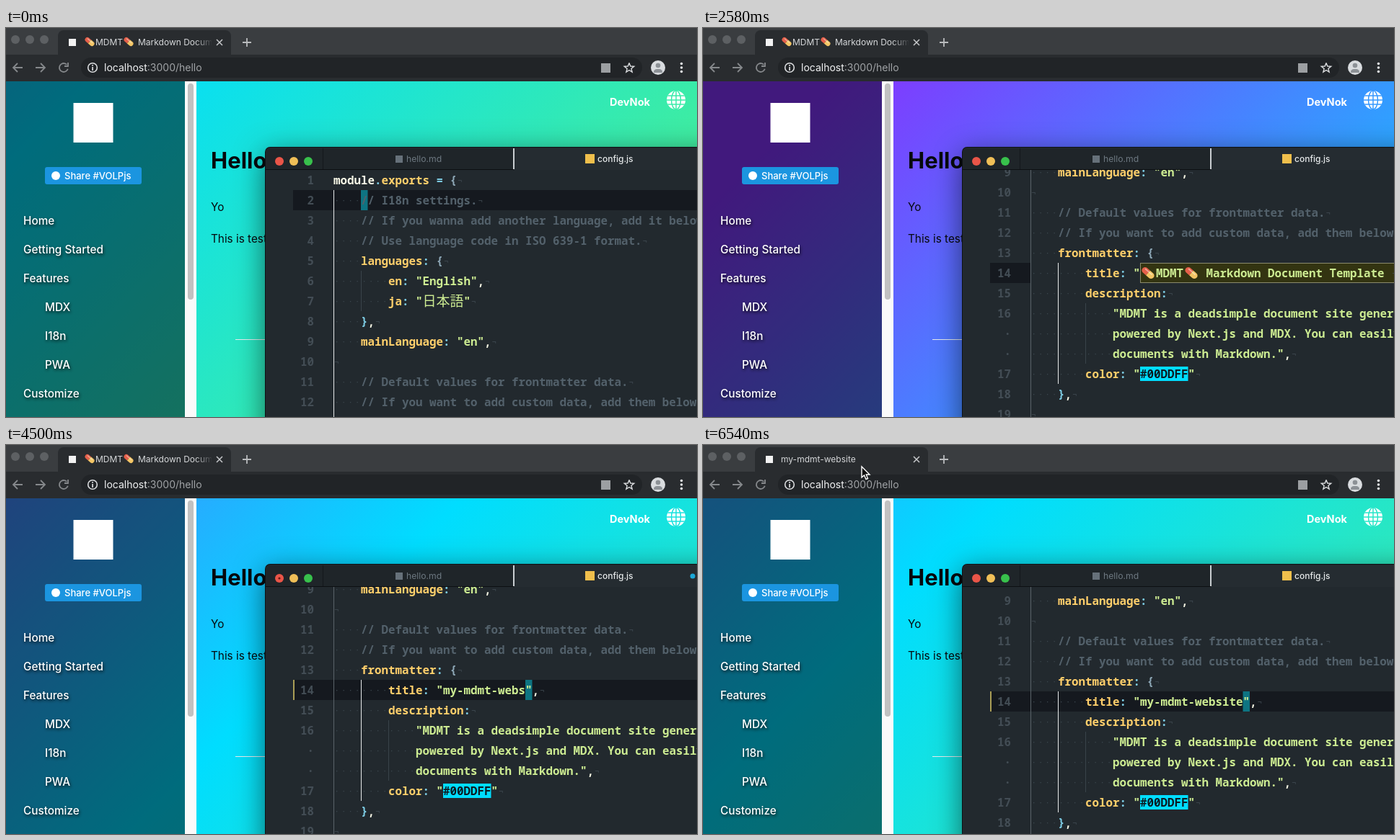
Animation, 958 px wide and 540 px high, one loop 6.6 s. Source, as an HTML page with a canvas:

```html
<!DOCTYPE html>
<html lang="en">
<head>
<meta charset="utf-8">
<title>Config editing</title>
<style>
html, body { margin: 0; width: 100%; height: 100%; overflow: hidden; background: #22282d; }
canvas { display: block; width: 958px; height: 540px; }
</style>
</head>
<body>
<canvas id="stage" width="958" height="540"></canvas>
<script>
const ctx = document.getElementById('stage').getContext('2d');
const W = 958, H = 540, LOOP = 6600, STEP = 60;
const SANS = 'Inter, Roboto, sans-serif';
const MONO = '600 15.833px "Noto Sans Mono", "DejaVu Sans Mono", monospace';
const CELL = 9.5, LEFT = 454, ROW = 28, TOP = 211;

// The page background drifts back and forth; a reload starts it again.
const HALF = 3000, FIRST_START = -2600, RELOAD = 5190, SECOND_START = 5090;
const CYAN_FAR = 1550, CYAN_NEAR = 100;

const INK = {
  c: '#53616b', k: '#ffcf6b', s: '#cdec92', p: '#7fd0e8',
  b: '#8fa9b8', w: '#f7f7e6', x: '#0b1a20', j: '#cdec92'
};

// Each segment starts with its ink key; "e" is the pill.
const ROWS = [
  ['1', 0, 'wmodule|p.|kexports|p = |b{'],
  ['2', 4, 'c// I18n settings.'],
  ['3', 4, 'c// If you wanna add another language, add it below.'],
  ['4', 4, 'c// Use language code in ISO 639-1 format.'],
  ['5', 4, 'klanguages|p: |b{'],
  ['6', 8, 'ken|p: |s"English"|w,'],
  ['7', 8, 'kja|p: |s"|j日本語|s"'],
  ['8', 4, 'p}|w,'],
  ['9', 4, 'kmainLanguage|p: |s"en"|w,'],
  ['10', 0, ''],
  ['11', 4, 'c// Default values for frontmatter data.'],
  ['12', 4, 'c// If you want to add custom data, add them below.'],
  ['13', 4, 'kfrontmatter|p: |b{'],
  ['14', 8, ''],
  ['15', 8, 'kdescription|p:'],
  ['16', 12, 's"MDMT is a deadsimple document site generator'],
  ['·', 12, 'spowered by Next.js and MDX. You can easily create'],
  ['·', 12, 'sdocuments with Markdown."|w,'],
  ['17', 8, 'kcolor|p: |s"|x#00DDFF|s"'],
  ['18', 4, 'p}|w,'],
  ['19', 0, '']
];

const clamp = u => Math.min(1, Math.max(0, u));
const mix = (a, b, u) => a + (b - a) * u;

// The CSS "ease" curve, cubic-bezier(.25, .1, .25, 1).
function ease(x) {
  const bez = (a, b, s) => 3 * a * s * (1 - s) ** 2 + 3 * b * s * s * (1 - s) + s ** 3;
  let lo = 0, hi = 1;
  for (let i = 0; i < 24; i++) {
    const s = (lo + hi) / 2;
    if (bez(0.25, 0.25, s) < x) lo = s; else hi = s;
  }
  return bez(0.1, 1, lo);
}

function cyanAt(t) {
  const phase = (t - (t < RELOAD ? FIRST_START : SECOND_START)) / HALF;
  const part = ease(phase % 1);
  const level = Math.floor(phase) % 2 ? 1 - part : part;
  return mix(CYAN_FAR, CYAN_NEAR, level);
}

function rect(x, y, w, h, fill) {
  ctx.fillStyle = fill;
  ctx.fillRect(x, y, w, h);
}

function round(x, y, w, h, r, fill) {
  ctx.beginPath();
  ctx.roundRect(x, y, w, h, r);
  ctx.fillStyle = fill;
  ctx.fill();
}

function disc(x, y, r, fill) {
  ctx.beginPath();
  ctx.arc(x, y, r, 0, Math.PI * 2);
  ctx.fillStyle = fill;
  ctx.fill();
}

function text(str, x, y, font, fill) {
  ctx.font = font;
  ctx.fillStyle = fill;
  ctx.fillText(str, x, y);
}

function lines(color, width, ...paths) {
  ctx.strokeStyle = color;
  ctx.lineWidth = width;
  ctx.beginPath();
  for (const p of paths)
    for (let i = 0; i < p.length; i += 2) ctx[i ? 'lineTo' : 'moveTo'](p[i], p[i + 1]);
  ctx.stroke();
}

function pill(x, y, size) {
  const r = size * 0.22, l = size * 0.5;
  ctx.save();
  ctx.translate(x, y);
  ctx.rotate(0.72);
  round(-l, -r, l, 2 * r, [r, 0, 0, r], '#e5604a');
  round(0, -r, l, 2 * r, [0, r, r, 0], '#f3c565');
  round(-l * 0.7, -r * 0.6, l * 1.3, r * 0.4, r * 0.2, 'rgba(255,255,255,.45)');
  ctx.restore();
}

function pageGradient(cyan) {
  const before = 1300, after = 1000;
  const from = (cyan - before) / 2, to = (cyan + after) / 2;
  const g = ctx.createLinearGradient(from, 74 + from, to, 74 + to);
  g.addColorStop(0, '#8533ff');
  g.addColorStop(before / (before + after), '#00ddff');
  g.addColorStop(1, '#44ee99');
  return g;
}

function drawBrowser(t) {
  rect(0, 0, W, 38, '#3a3d40');
  round(72, 3, 240, 36, [8, 8, 0, 0], '#292c2f');
  rect(0, 37, W, 37, '#292c2f');
  round(104, 41, 778, 28, 14, '#212427');
  for (const x of [13, 33, 53]) disc(x, 16, 6, '#5d6063');

  rect(87, 15, 10, 10, '#f2f2f2');
  const font = '400 12px ' + SANS;
  if (t < 5040) {
    pill(116, 19, 15);
    text('MDMT', 124, 24, font, '#d5d7d9');
    pill(170, 19, 15);
    ctx.save();
    ctx.beginPath();
    ctx.rect(180, 4, 105, 30);
    ctx.clip();
    const fade = ctx.createLinearGradient(262, 0, 285, 0);
    fade.addColorStop(0, '#d5d7d9');
    fade.addColorStop(1, '#33363a');
    text('Markdown Document', 183, 24, font, fade);
    ctx.restore();
  } else {
    text('my-mdmt-website', 108, 24, font, '#d5d7d9');
  }
  lines('#c8cacc', 1.5, [292, 16, 300, 24], [300, 16, 292, 24]);
  lines('#b9bbbd', 1.8, [328, 20, 340, 20], [334, 14, 334, 26]);

  lines('#85888b', 1.8, [23, 55, 10, 55], [16, 49, 10, 55, 16, 61],
    [41, 55, 54, 55], [48, 49, 54, 55, 48, 61]);
  ctx.beginPath();
  ctx.arc(80, 55, 6, 0.3, 5.5);
  ctx.stroke();
  lines('#85888b', 1.8, [86, 48, 86, 53, 81, 53]);

  ctx.strokeStyle = '#dcdee0';
  ctx.lineWidth = 1.6;
  ctx.beginPath();
  ctx.arc(120, 55, 6.3, 0, Math.PI * 2);
  ctx.stroke();
  rect(119.2, 54, 1.7, 5, '#dcdee0');
  rect(119.2, 51, 1.7, 1.8, '#dcdee0');
  text('localhost', 136, 60, '400 14px ' + SANS, '#f1f2f3');
  const w = ctx.measureText('localhost').width;
  text(':3000/hello', 136 + w, 60, '400 14px ' + SANS, '#a0a3a6');

  rect(825, 49, 13, 13, '#9c9fa2');
  const star = [];
  for (let i = 0; i <= 10; i++) {
    const a = i * Math.PI / 5 - Math.PI / 2, r = i % 2 ? 3 : 7;
    star.push(864 + r * Math.cos(a), 55.5 + r * Math.sin(a));
  }
  lines('#dcdee0', 1.4, star);

  disc(904, 55, 10, '#d9dcdf');
  disc(904, 52, 3.3, '#8c9196');
  round(898, 57, 12, 5, [5, 5, 1, 1], '#8c9196');
  for (const y of [49.5, 55, 60.5]) disc(936.5, y, 1.8, '#e4e6e8');
}

function drawGlobe(fill) {
  disc(929, 100, 13, '#fff');
  ctx.save();
  ctx.beginPath();
  ctx.arc(929, 100, 13, 0, Math.PI * 2);
  ctx.clip();
  lines(fill, 1.5, [929, 86, 929, 114], [915, 100, 943, 100], [915, 94, 943, 94], [915, 106, 943, 106]);
  ctx.beginPath();
  ctx.ellipse(929, 100, 6.5, 13, 0, 0, Math.PI * 2);
  ctx.stroke();
  ctx.restore();
}

function drawSite(t) {
  const fill = pageGradient(cyanAt(t));
  rect(0, 74, W, H - 74, fill);
  rect(0, 74, 248, H - 74, 'rgba(0,0,0,.51)');
  rect(248, 74, 16, H - 74, '#fafafa');
  round(252, 77, 8, 300, 4, '#c1c1c1');

  rect(93.5, 104, 55, 55, '#fff');
  round(54, 193, 134, 24, 3, '#1b95e0');
  disc(69, 205, 6, '#fff');
  text('Share #VOLPjs', 81, 210, '500 13px ' + SANS, '#fff');

  ctx.save();
  ctx.shadowColor = 'rgba(0,0,0,.8)';
  ctx.shadowBlur = 4;
  ctx.shadowOffsetX = 1;
  ctx.shadowOffsetY = 2;
  ['Home', 'Getting Started', 'Features', '>MDX', '>I18n', '>PWA', 'Customize'].forEach((s, i) => {
    const sub = s[0] === '>';
    text(sub ? s.slice(1) : s, sub ? 54 : 24, 273 + i * 40, '500 15.3px ' + SANS, '#fff');
  });
  ctx.restore();

  text('DevNok', 837, 108, '700 14.5px ' + SANS, '#fff');
  drawGlobe(fill);
  text('Hello', 284, 195, '700 31px ' + SANS, '#06090d');
  text('Yo', 284, 254, '400 15.3px ' + SANS, '#06090d');
  text('This is test', 284, 298, '400 15.3px ' + SANS, '#06090d');
  rect(318, 432, 60, 1, '#e8eef0');
}

function cursorRow(t) {
  if (t < 1300) return Math.min(16, Math.max(1, 1 + Math.floor((t - 150) / 50)));
  return Math.max(13, 16 - Math.floor((t - 1300) / 70));
}

function editorState(t) {
  const row = cursorRow(t);
  const edited = t >= 2940;
  const typed = 'my-mdmt-website'.slice(0, Math.max(0, Math.floor((t - 3080) / 110)));
  const scroll = t < 1300
    ? Math.max(0, TOP + ROW * row - 424)
    : 235 - 16 * clamp((t - 5220) / 240);
  let col = row === 9 ? 0 : row === 16 ? 12 : 4;
  if (t >= 1680) col = 16;
  if (edited) col = 16 + typed.length;
  return {
    row, edited, typed, scroll, col,
    selecting: t >= 2400 && !edited,
    blinkOff: t >= 4980 && t < 5340,
    unsaved: edited && t < 4860
  };
}

function activeGuide(row) {
  if (row >= 15 && row <= 17) return [8, 15, 17];
  if (row >= 13 && row <= 18) return [4, 13, 18];
  if (row === 5 || row === 6) return [4, 5, 6];
  return [0, 1, 20];
}

function drawSegments(code, x, y) {
  for (const seg of code ? code.split('|') : []) {
    const key = seg[0], str = seg.slice(1);
    if (key === 'e') {
      pill(x + 11, y, 20);
      x += 22;
    } else if (key === 'j') {
      text(str, x, y + 7, '500 19px "Noto Sans CJK JP", "Noto Sans CJK", sans-serif', INK.j);
      x += str.length * 2 * CELL;
    } else {
      if (key === 'x') rect(x, y - 10, str.length * CELL, 20, '#00ddff');
      text(str, x, y + 5.5, MONO, INK[key]);
      x += str.length * CELL;
    }
  }
  return x;
}

function drawCode(s) {
  const mid = row => TOP + ROW * row - s.scroll;
  const at = col => LEFT + col * CELL;
  const guide = (col, a, b, color) => rect(at(col), mid(a) - 14, 1, (b - a + 1) * ROW, color);
  const y = mid(s.row);

  rect(398, y - 14, s.selecting ? 57 : W - 398, ROW, '#15191f');
  if (s.edited) rect(398, y - 14, 2, ROW, '#a99d55');
  guide(0, 1, 20, '#5a636a');
  guide(4, 5, 6, '#39434a');
  guide(4, 13, 18, '#4b555c');
  guide(8, 15, 17, '#39434a');
  guide(...activeGuide(s.row), '#e6e9ea');

  if (s.selecting) {
    rect(606, y - 14, W - 606, 28, '#8a8a6c');
    rect(607, y - 13, W - 607, 26, '#333411');
  } else if (!s.blinkOff) {
    rect(at(s.col), y - 14, CELL, ROW, '#0e7482');
  }

  const title = s.edited
    ? 'ktitle|p: |s"' + s.typed + '"|w,'
    : 'ktitle|p: |s"|e|sMDMT|e|s Markdown Document Template ';
  ROWS.forEach(([num, indent, code], i) => {
    const cy = mid(i);
    if (cy < 180 || cy > 560) return;
    ctx.textAlign = 'right';
    text(num, 427, cy + 5.5, MONO, '#434d55');
    ctx.textAlign = 'left';
    for (let c = 0; c < indent; c++) rect(at(c) + 4, cy, 1.3, 1.3, '#3b464d');
    const end = drawSegments(i === 13 ? title : code, at(indent), cy);
    text('¬', end + 1, cy + 4, '400 11px "Noto Sans Mono", monospace', '#414c54');
  });
}

function drawEditor(t) {
  const s = editorState(t);
  ctx.save();
  ctx.shadowColor = 'rgba(0,0,0,.55)';
  ctx.shadowBlur = 40;
  ctx.shadowOffsetY = 10;
  round(359, 165, 700, 460, 7, '#0e1215');
  ctx.restore();
  round(360, 166, 700, 460, 6, '#22292e');

  ctx.save();
  ctx.beginPath();
  ctx.rect(360, 197, W - 360, H - 197);
  ctx.clip();
  drawCode(s);
  ctx.restore();

  round(360, 167, 343, 29, [6, 0, 0, 0], '#1f2529');
  rect(705, 167, W - 705, 30, '#252c31');
  rect(360, 196, 344, 1, '#0c0f12');
  rect(439, 167, 1, 29, '#14181b');
  rect(703, 167, 2, 29, '#c9ced1');
  ['#ea5548', '#f0bf57', '#38c14c'].forEach((c, i) => disc(379 + 20 * i, 185, 6, c));
  if (s.unsaved) {
    disc(379, 185, 1.6, '#6d1811');
    disc(952, 182, 3.5, '#1ba8d8');
  }
  rect(540, 177, 10, 10, '#66717a');
  text('hello.md', 555, 186, '400 12.2px ' + SANS, '#6d7880');
  rect(803, 175, 13, 13, '#f0bf4c');
  text('config.js', 820, 186, '500 12px ' + SANS, '#e6e9ea');
}

function drawMouse(t) {
  if (t < 5280) return;
  const reach = 1 - (1 - clamp((t - 5280) / 420)) ** 3;
  const drift = clamp((t - 5760) / 600);
  ctx.save();
  ctx.translate(mix(560, 211, reach) + 9 * drift, mix(330, 40, reach) - 10 * drift);
  ctx.beginPath();
  const tip = [0, 0, 0, 15, 3.5, 12, 6, 17.5, 8.5, 16.5, 6.2, 11, 11, 11];
  for (let i = 0; i < tip.length; i += 2) ctx.lineTo(tip[i], tip[i + 1]);
  ctx.closePath();
  ctx.fillStyle = '#0a0a0a';
  ctx.strokeStyle = '#fff';
  ctx.lineWidth = 1.4;
  ctx.fill();
  ctx.stroke();
  ctx.restore();
}

const start = performance.now();
function frame() {
  const elapsed = (performance.now() - start) % LOOP;
  const t = Math.floor(elapsed / STEP) * STEP;
  drawSite(t);
  drawBrowser(t);
  drawEditor(t);
  drawMouse(t);
  requestAnimationFrame(frame);
}
frame();
</script>
</body>
</html>
```
